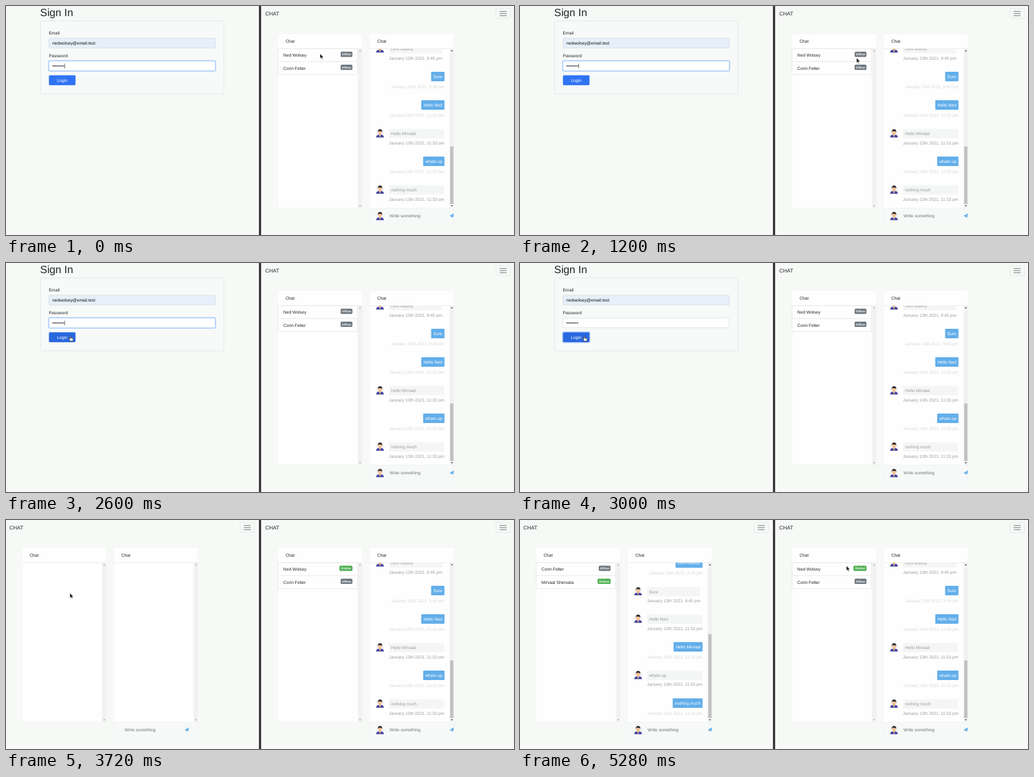
These frames come from a looping animation (800 px wide and 362 px high, 5.32 s). An HTML page:

```html
<!DOCTYPE html>
<html lang="en">
<head>
<meta charset="utf-8">
<title>Chat</title>
<style>
html, body { margin: 0; width: 100%; height: 100%; overflow: hidden; background: #f7f9f7; }
svg { display: block; width: 100%; height: 100%; }
text { font-family: "Liberation Sans", Arial, sans-serif; font-size: 6.75px; fill: #212529; text-rendering: geometricPrecision; white-space: pre; }
</style>
</head>
<body>
<svg id="stage" viewBox="0 0 800 362"></svg>
<script>
const LOOP = 5320, PAGE = 3160, ONLINE = 3480, DATA = 3760, CLICK = 2880;
const BLUE = '#62aeea', GREY = '#f4f6f5';

const rect = (x, y, w, h, fill, extra = '') =>
  `<rect x="${x}" y="${y}" width="${w}" height="${h}" fill="${fill}" ${extra}/>`;
const text = (x, y, s, fill = '#212529', extra = '') =>
  `<text x="${x}" y="${y}" style="fill:${fill};${extra}">${s}</text>`;
const path = (d, fill, extra = '') => `<path d="${d}" fill="${fill}" ${extra}/>`;
const group = (id, body, extra = '') => `<g id="${id}" ${extra}>${body}</g>`;

const avatar = (x, y) => `<g transform="translate(${x} ${y})">
  <circle r="6.6" fill="#f1f3f2"/>
  ${path('M-6 6.4C-6 3.4-3.6 2.4-1.6 2H1.6C3.6 2.4 6 3.4 6 6.4Z', '#41419f')}
  ${path('M-1.8 1.9H1.8L0 5.6Z', '#f6f6fa')}
  ${path('M-.6 2.6H.6L.5 5 0 6-.5 5Z', '#d8a24b')}
  ${rect(-1.2, 0, 2.4, 2.9, '#e6a878')}
  <ellipse cy="-1.7" rx="2.9" ry="3.6" fill="#f5c294"/>
  ${path('M-3.3-1.5C-4-5 -2-6.6 .3-6.5 3-6.4 3.9-4.4 3.3-1.5L2.6-3.2C1-3 -.6-3.4-1.5-4.1L-2.6-3Z', '#2c2a33')}</g>`;

const plane = (x, y) => path('M0 3.7 6.6 0 5.5 6.2 3.3 5.2 2.3 6.8V4.9L5.3 1.6 1.6 4.4Z',
  '#4aa3ee', `transform="translate(${x} ${y})"`);

const badge = (y, on) => (on
  ? rect(525.2, y, 20.4, 8.3, '#4caf50', 'rx="1.6"')
  : rect(527, y, 18.5, 8.3, '#6c757d', 'rx="1.6"'))
  + text(on ? 535.4 : 536.2, y + 5.9, on ? 'Online' : 'Offline', '#fff',
    `font-weight:700;font-size:${on ? 5 : 4.7}px;text-anchor:middle`);

const arrows = (x, up, down) =>
  path(`M${x - 1.6} 71.5h3.2l-1.6-2Z`, up) + path(`M${x - 1.6} 315h3.2l-1.6 2Z`, down);

// Static parts of a chat page, in right-hand coordinates
const frame = () => {
  let s = text(408.3, 14.9, 'CHAT', '#212529', 'font-size:8.33px')
    + rect(771.5, 4.2, 23, 15.6, 'none', 'rx="1.8" stroke="#dcdedc" stroke-width=".6"');
  for (const y of [8.7, 12, 15.3])
    s += path(`M777.4 ${y}h11`, 'none', 'stroke="#686a69" stroke-width=".9"');
  for (const x of [428, 572.5]) {
    s += rect(x, 43.5, 133, 276, '#fefefe', 'stroke="#eff1ef" stroke-width=".5"')
      + rect(x, 67, 133, .6, '#dfe1df')
      + rect(x + 126.3, 67.5, 6.7, 252, '#f1f1f1')
      + arrows(x + 129.6, '#a3a3a3', '#a3a3a3')
      + text(x + 12.2, 57.5, 'Chat');
  }
  return s + rect(572.5, 319.7, 133, 25.5, '#f7f9f8', 'stroke="#eff1ef" stroke-width=".5"');
};

const row = (y, name) => rect(428.3, y, 125.3, 20.6, '#fefefe', 'stroke="#dfdfdf" stroke-width=".6"')
  + text(436.8, y + 12.6, name);

// Outgoing messages carry a bubble width, incoming ones do not
const message = ([y, body, late, w]) => {
  const date = `January 13th 2021, ${late ? '11:33' : '9:45'} pm`;
  return w
    ? rect(690.5 - w, y, w, 15, BLUE, 'rx="1.2"')
      + text(690.5 - w / 2, y + 9.9, body, '#fff', 'text-anchor:middle')
      + text(690.4, y + 25.7, date, '#d5d7d7', 'text-anchor:end')
    : avatar(589, y + 6.7) + rect(603, y, late ? 87 : 84, 14.6, GREY, 'rx="1"')
      + text(606.3, y + 9.8, body, '#999c9d') + text(603, y + 24.1, date, '#999c9e');
};

const filled = (names, list, thumb) => names.map((n, i) => row(67.5 + 20.5 * i, n)).join('')
  + group('', list.map(message).join(''), 'clip-path="url(#log)"')
  + rect(699.4, thumb, 5.2, 313 - thumb, '#c1c1c1') + arrows(702.1, '#505050', '#505050')
  + avatar(589, 332) + text(604, 334, 'Write something', '#6c7378') + plane(698.6, 328);

const rightLog = [
  [60.4, 'Lets deploy.', 0], [104, 'Sure', 0, 21], [149, 'Hello Ned', 1, 36.5],
  [194.6, 'Hello Mirvaal', 1], [238, 'whats up', 1, 33.5], [283.6, 'nothing much', 1]
];
const leftLog = [
  [60.4, 'Lets deploy.', 0, 42.5], [106, 'Sure', 0], [149.4, 'Hello Ned', 1],
  [193, 'Hello Mirvaal', 1, 45.7], [238.3, 'whats up', 1], [282, 'nothing much', 1, 47]
];

const field = (y, fill, stroke) =>
  rect(67.7, y, 261.8, 15.4, fill, `rx="1.7" stroke="${stroke}" stroke-width=".6"`);
const ring = (x, y, w, h) =>
  rect(x, y, w, h, 'none', 'rx="2.4" stroke="#c3dafb" stroke-width="1.5"');

const login = text(53.8, 16, 'Sign In', '#212529', 'font-size:16.67px')
  + rect(54.3, 23.6, 288.8, 115.2, '#f8faf9', 'rx="2" stroke="#d8dbd9" stroke-width=".6"')
  + text(67.6, 44.6, 'Email') + field(51, '#e6effa', '#ced4da')
  + text(72.9, 60.9, 'nedwolsey@email.test', '#111')
  + text(67.6, 80.5, 'Password') + field(87, '#fff', '#ced4da')
  + group('focus', ring(66.9, 86.2, 263.4, 17) + field(87, '#fff', '#7fb2f8'))
  + text(72.9, 97.1, '••••••••') + group('caret', rect(92, 91.2, .6, 7.4, '#222'))
  + group('pressed', ring(66.9, 108.8, 43.3, 17.2))
  + rect(67.6, 109.6, 41.9, 15.6, '#3074f3', 'rx="1.7" id="button"')
  + text(88.6, 119.7, 'Login', '#fff', 'text-anchor:middle');

const arrowShape = path('M0 0V8L1.9 6.3 3.1 9 4.4 8.4 3.2 5.8H5.7Z', '#1b1b1b',
  'stroke="#f4f4f4" stroke-width=".6"');
const handShape = path('M0 .6C0-.3 1.3-.3 1.3 .6V3.4L4.6 4.1C5.2 4.3 5.3 4.8 5.2 5.4L4.6 8.4H.6L-1.5 5.4C-1.8 4.7-1 4.3-.5 4.8L0 5.3Z',
  '#fff', 'stroke="#1b1b1b" stroke-width=".7"');

document.getElementById('stage').innerHTML =
  `<clipPath id="log">${rect(573, 67.6, 126, 251.8, '#000')}</clipPath>`
  + rect(0, 0, 800, 362, '#f7f9f7')
  + group('login', login)
  + group('left', frame()
    + group('empty', text(589.8, 334, 'Write something', '#6c7378') + plane(684.3, 328))
    + group('data', filled(['Corin Felter', 'Mirvaal Shervata'], leftLog, 180.5)
      + badge(72.2, false) + badge(92.7, true)), 'transform="translate(-403 0)"')
  + group('right', frame() + filled(['Ned Wolsey', 'Corin Felter'], rightLog, 222)
    + group('off', badge(72.2, false)) + group('on', badge(72.2, true)) + badge(92.7, false))
  + rect(398, 0, 4, 362, '#8c8e8c') + rect(398.8, 0, 2.6, 362, '#2c2c2c')
  + group('cursor', group('arrow', arrowShape) + group('hand', handShape));

const $ = id => document.getElementById(id);
const show = (id, on) => $(id).setAttribute('visibility', on ? 'inherit' : 'hidden');

// Pointer path: time, x, y
const keys = [
  [0, 494.5, 75.3], [600, 530, 81.8], [1200, 530, 82], [1680, 436, 141.2], [1840, 436, 142],
  [2060, 453, 206], [2400, 325, 69], [2560, 100.6, 115], [3720, 100.6, 115.5],
  [4160, 530, 80], [4280, 530, 86.3], [4540, 537, 77], [4800, 528, 86], [5000, 531, 86]
];

function pointer(t) {
  if (t >= 5280) return [514, 72.3];
  const i = keys.findIndex(k => k[0] > t);
  if (i < 0) return keys[keys.length - 1].slice(1);
  const [t0, x0, y0] = keys[i - 1], [t1, x1, y1] = keys[i];
  const u = (t - t0) / (t1 - t0), e = u * u * (3 - 2 * u);
  return [x0 + (x1 - x0) * e, y0 + (y1 - y0) * e];
}

function draw(time) {
  const t = Math.floor(time % LOOP / 40) * 40;
  const [x, y] = pointer(t);
  const signIn = t < PAGE, over = signIn && x < 109 && y > 109;
  show('login', signIn);
  show('left', !signIn);
  show('empty', t < DATA);
  show('data', t >= DATA);
  show('off', t < ONLINE);
  show('on', t >= ONLINE);
  show('focus', t < CLICK);
  show('pressed', t >= CLICK);
  show('caret', t < CLICK && (t + 100) % 1200 < 600);
  $('button').setAttribute('fill', over ? '#2a68df' : '#3074f3');
  show('arrow', !over);
  show('hand', over);
  $('cursor').setAttribute('transform', `translate(${x} ${y})`);
}

const start = performance.now();
function tick() {
  draw(performance.now() - start);
  requestAnimationFrame(tick);
}
tick();
</script>
</body>
</html>
```
